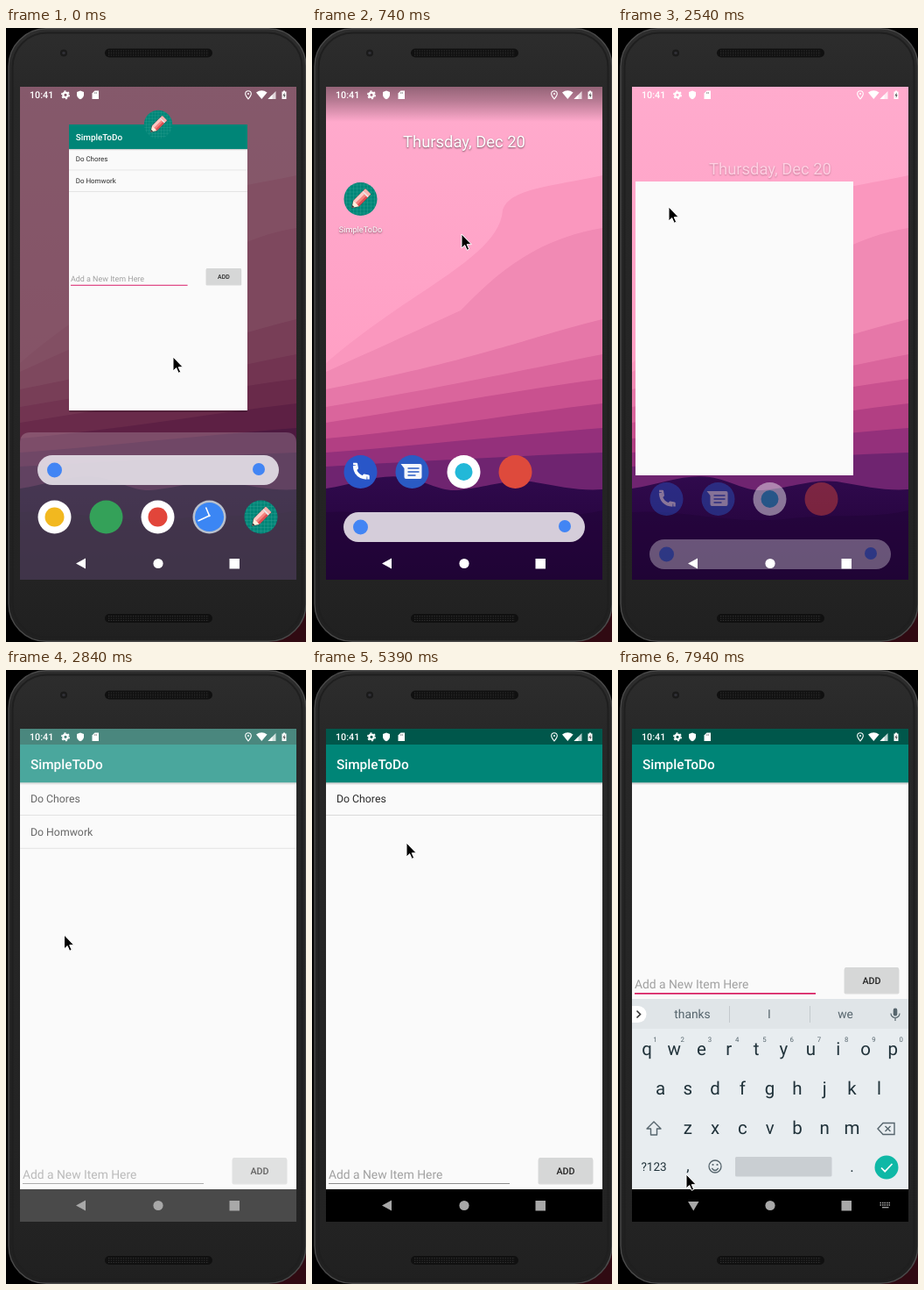
Animation of 343x700 px, one loop 8000 ms. Source, as an HTML page:

```html
<!DOCTYPE html>
<html lang="en">
<head>
<meta charset="utf-8">
<title>To-do app demo</title>
<style>
  html, body { margin: 0; width: 100%; height: 100%; overflow: hidden; background: #000; }
  svg { display: block; width: 343px; height: 700px; }
  text { font-family: Roboto, Arial, sans-serif; text-rendering: geometricPrecision; }
  .med { font-weight: 500; }
  .mid { text-anchor: middle; }
  .glow { text-shadow: 0 1px 2px rgba(0, 0, 0, .55); }
</style>
</head>
<body>
<svg id="stage" viewBox="0 0 343 700"></svg>
<script>
const LOOP = 8000;
const $ = id => document.getElementById(id);

// ---------- drawing helpers ----------
const rect = (x, y, w, h, fill, more = '') =>
  `<rect x="${x}" y="${y}" width="${w}" height="${h}" fill="${fill}" ${more}/>`;
const disc = (x, y, r, fill, more = '') =>
  `<circle cx="${x}" cy="${y}" r="${r}" fill="${fill}" ${more}/>`;
const path = (d, fill, more = '') => `<path d="${d}" fill="${fill}" ${more}/>`;
const line = (d, color, w, more = '') =>
  `<path d="${d}" fill="none" stroke="${color}" stroke-width="${w}" ${more}/>`;
const text = (x, y, size, fill, str, cls = '') =>
  `<text x="${x}" y="${y}" font-size="${size}" fill="${fill}" class="${cls}">${str}</text>`;
const group = (id, body, more = '') => `<g id="${id}" ${more}>${body}</g>`;
const at = (x, y, body, s = 1) => `<g transform="translate(${x} ${y}) scale(${s})">${body}</g>`;

// ---------- defs ----------
const stops = (...list) =>
  list.map(([o, c, a = 1]) => `<stop offset="${o}" stop-color="${c}" stop-opacity="${a}"/>`).join('');
const fade = (id, ...list) =>
  `<linearGradient id="${id}" x1="0" y1="0" x2="0" y2="1">${stops(...list)}</linearGradient>`;
const clip = (id, x, y, w, h) => `<clipPath id="${id}">${rect(x, y, w, h, '#000')}</clipPath>`;
const defs = `<defs>
  ${fade('body', [0, '#2d2d2d'], [.1, '#282828'], [.9, '#232323'], [1, '#202020'])}
  ${fade('sky', [0, '#ffabcd'], [.6, '#ff9fc4'], [1, '#f58eb8'])}
  ${fade('ground', [0, '#300a4d'], [.5, '#270540'], [1, '#1e0433'])}
  ${fade('topshade', [0, '#000', .42], [.4, '#000', .28], [1, '#000', 0])}
  ${fade('barshade', [0, '#000', .22], [1, '#000', 0])}
  ${clip('screen', 16, 67, 316, 562)}
  ${clip('above', 16, 67, 316, 525)}
  ${clip('cardbox', 16, 85, 316, 505)}
  <clipPath id="rowbox"><rect id="rowclip" x="16" y="129" width="316" height="37"/></clipPath>
  <clipPath id="round"><circle r="19"/></clipPath>
</defs>`;

// ---------- phone ----------
function phone() {
  const speaker = (y, h) => rect(113, y, 123, h, '#101010', `rx="${h / 2}"`) +
    [2.5, 5, 7.5].map(o => line(`M117 ${y + o}H232`, '#333', 1, 'stroke-dasharray="1.3 1.5"')).join('');
  return rect(0, 0, 343, 700, '#000') +
    path('M343 640V700H300Z', '#300a12') +
    rect(3, .8, 340, 698.5, 'url(#body)', 'rx="43" stroke="#4a4a4a" stroke-width="1.4"') +
    rect(7.5, 5.5, 331, 689, 'none', 'rx="39" stroke="#1f1f1f" stroke-width="2"') +
    speaker(23.5, 10) + speaker(668, 10) +
    disc(66, 28.5, 4, '#1a1a1a') + disc(66, 28.5, 1.8, '#303036');
}

// ---------- icons ----------
function pencil() {
  let grid = '';
  for (let i = -16; i <= 16; i += 4) grid += `M${i} -19V19M-19 ${i}H19`;
  return disc(0, 0, 19, '#008577') +
    line(grid, '#36a295', .4, 'clip-path="url(#round)"') +
    `<g transform="rotate(-45)">` +
    path('M-14 0L-7 -4.5H12V4.5H-7Z', '#f5837f', 'stroke="#4b3434" stroke-width=".8"') +
    path('M-14 0L-7 -4.5V4.5Z', '#fff0dd') + path('M-14 0L-11.5 -1.6V1.6Z', '#333') +
    rect(-7, -4.5, 14, 3.6, '#ffc9c5') + rect(-7, 2, 14, 2.5, '#dc4f53') +
    rect(7, -4.5, 2, 9, '#e8e8e8') + rect(9, -4.5, 3.4, 9, '#f8b5b0', 'rx="1"') + `</g>`;
}
const handset = () => disc(0, 0, 19, '#2956c8') +
  line('M-7 -7Q-6 6 7 7', '#fff', 3.4) +
  line('M-8.4 -9H-4.6L-3.8 -4L-6.4 -2M9 8.4V4.6L4 3.8L2 6.4', '#fff', 2.4, 'stroke-linejoin="round"');
const bubble = () => disc(0, 0, 19, '#2a5bc4') +
  path('M-13 -9H9Q11 -9 11 -7V6Q11 8 9 8H-7Q-9 8 -9 6V-4Z', '#f4f6fb') +
  line('M-5 -4H8M-5 0H8M-5 4H4', '#2a5bc4', 1.5);
const clock = () => disc(0, 0, 19, '#b9c0cc') + disc(0, 0, 16.5, '#3b86f4') +
  line('M-13 4.5L0 -1.5L-4 -11', '#fff', 1.6, 'stroke-linejoin="round"') + disc(0, -1.5, 1.2, '#fff');
const plain = (fill, r = 11) => disc(0, 0, 19, '#fff') + disc(0, 0, r, fill);

// ---------- launcher ----------
function wallpaper() {
  const bands = [
    ['M332 168C280 180 225 182 218 208C214 262 110 300 16 382', '#fa97be'],
    ['M332 228C260 240 215 275 170 322C120 345 60 372 16 392', '#f18ab4'],
    ['M332 332C250 352 190 378 16 412', '#e677a8'],
    ['M332 372C240 390 150 410 16 432', '#da659c'],
    ['M332 400C240 412 130 432 16 450', '#c9518f'],
    ['M332 428C230 440 130 458 16 468', '#b23f83'],
    ['M332 456C230 464 120 476 16 484', '#94307b'],
    ['M332 484C230 488 120 494 16 500', '#6f2470']
  ];
  return rect(16, 67, 316, 562, 'url(#sky)') +
    bands.map(([d, c]) => path(d + 'V629H332Z', c)).join('') +
    path('M16 525C50 520 75 508 105 512C130 516 145 528 165 527C200 524 220 514 250 517C280 522 305 528 332 526V629H16Z', 'url(#ground)') +
    path('M16 552C70 548 130 566 190 560C250 553 290 560 332 550V629H16Z', '#210438', 'opacity=".55"');
}
const slots = [55.5, 114.5, 173.5, 232.5, 291.5];
const row = (y, icons) => icons.map((icon, i) => at(slots[i], y, icon)).join('');
const home = () =>
  text(174, 136, 18.4, '#fff', 'Thursday, Dec 20', 'mid glow') +
  at(55.5, 195, pencil()) +
  text(55.5, 233, 9.2, '#fff', 'SimpleToDo', 'mid glow') +
  row(506, [handset(), bubble(), plain('#22b8d8', 10), disc(0, 0, 19, '#de4a3c')]);
const search = () => rect(36, 552, 276, 34, '#e4dfe8', 'rx="17" opacity=".92"') +
  disc(55.5, 569, 8.5, '#4285f4') + disc(289, 568, 7, '#4285f4');
const shelf = () => path('M16 629V473Q16 461 28 461H320Q332 461 332 473V629Z', '#fff', 'opacity=".2"') +
  row(557.5, [plain('#f2b81f'), disc(0, 0, 19, '#34a159'), plain('#e2453a'), clock(), pencil()]);

// ---------- to-do app ----------
const item = (id, y, label) => group(id, text(28, y + 22, 12.29, '#2a2a2a', label) +
  rect(16, y + 36.2, 316, 1, '#d9d9d9'));
const entry = (id, color, thick) =>
  text(19, 580, 13.83, '#a0a0a0', 'Add a New Item Here') +
  `<rect id="${id}" x="19" y="585" width="207" height="${thick}" fill="${color}"/>` +
  rect(258.5, 557, 63, 29.4, '#000', 'rx="2" opacity=".13"') +
  rect(259, 556, 62, 29, '#d6d7d7', 'rx="1.5"') +
  text(290, 574.6, 10.75, '#222', 'ADD', 'med mid');
const toolbar = () => rect(16, 85, 316, 43.3, '#008577') + rect(16, 128.3, 316, 3, 'url(#barshade)') +
  text(28, 112.6, 15.36, '#fff', 'SimpleToDo', 'med');

const card = () =>
  rect(72, 111, 204, 327, '#000', 'rx="2" opacity=".2"') +
  `<g transform="translate(72 110) scale(.6456) translate(-16 -85)" clip-path="url(#cardbox)">` +
  rect(16, 85, 316, 505, '#fafafa') + toolbar() +
  item('c1', 128.8, 'Do Chores') + item('c2', 166.6, 'Do Homwork') +
  `<g transform="translate(0 -217)">${entry('cline', '#e0508a', 2)}</g></g>` +
  at(174, 110, pencil(), .85);

const app = () =>
  rect(16, 67, 316, 525, '#fafafa') +
  group('press', rect(16, 129, 316, 37, '#000', 'opacity=".06"') +
    '<circle id="ripple" fill="#000" opacity=".09"/>', 'clip-path="url(#rowbox)"') +
  rect(16, 67, 316, 18.2, '#00574b') + toolbar() +
  item('row1', 128.8, 'Do Chores') + item('row2', 166.6, 'Do Homwork') +
  group('entry', entry('under', '#8c8c8c', 1)) +
  rect(16, 592, 316, 37, '#000');

function keyboard() {
  const ink = '#20323a', soft = '#56656d';
  const keys = (str, x, y) => [...str].map((c, i) => text(x + 31.25 * i, y, 20.5, ink, c, 'mid')).join('');
  const digits = [...'1234567890'].map((c, i) => text(42.5 + 31.25 * i, 424, 7.8, soft, c, 'mid')).join('');
  return rect(16, 375, 316, 217, '#e8edf0') + rect(16, 375, 316, 34, '#e0e5e8') +
    path('M16 383H23A9.5 9.5 0 0 1 23 402H16Z', '#fff') +
    line('M21.5 388.5L25.5 392.5L21.5 396.5', '#333', 1.6) +
    line('M127.5 383V402M219.5 383V402', '#c3c9cd', 1) +
    text(85, 397.3, 13.8, soft, 'thanks', 'mid') + text(173, 397.3, 13.8, soft, 'I', 'mid') +
    text(260, 397.3, 13.8, soft, 'we', 'mid') +
    rect(314.7, 385.5, 4.6, 9, soft, 'rx="2.3"') +
    line('M312 391.5A5 5 0 0 0 322 391.5M317 396.5V400', soft, 1.2) +
    keys('qwertyuiop', 33, 438.5) + digits +
    keys('asdfghjkl', 48.6, 483.5) + keys('zxcvbnm', 79.9, 529) +
    line('M41 515L49 523H44.5V530H37.5V523H33Z', soft, 1.4, 'stroke-linejoin="round"') +
    line('M303 516.5H316V529.5H303L297 523ZM305.5 520L311.5 526M311.5 520L305.5 526', soft, 1.4) +
    text(41, 571, 13.5, ink, '?123', 'mid') + text(80, 571, 17, ink, ',', 'mid') +
    text(267.5, 572, 17, ink, '.', 'mid') +
    disc(111, 566, 7, 'none', `stroke="${soft}" stroke-width="1.3"`) +
    disc(108.5, 564, 1.1, soft) + disc(113.5, 564, 1.1, soft) +
    line('M107.3 568Q111 573 114.7 568', soft, 1.3) +
    rect(134, 555, 110.5, 22.5, '#c9ced2', 'rx="1.5"') +
    disc(307, 567, 13.5, '#0fb8a6') + line('M301 567.5L305.2 571.7L313.5 563', '#fff', 1.7);
}

// ---------- system bars ----------
const status = () => text(27, 80.4, 10.75, '#fff', '10:41', 'med') +
  disc(68, 76.3, 2.7, 'none', 'stroke="#fff" stroke-width="2.2"') +
  disc(68, 76.3, 4.3, 'none', 'stroke="#fff" stroke-width="1.4" stroke-dasharray="2.2 2.3"') +
  path('M85 71.5L89 73V76.5Q88.6 79.7 85 81.3Q81.400 79.7 81 76.5V73Z', '#fff') +
  path('M98.500 74.500L101.500 71.500H106V81H98.500Z', '#fff') +
  line('M101.7 73V75M103.300 73V75', '#777', .7) +
  line('M277 81Q273.700 77 273.700 75A3.300 3.300 0 0 1 280.300 75Q280.300 77 277 81Z', '#fff', 1.1) +
  disc(277, 75, 1, '#fff') +
  path('M286 73.500Q292.300 69 298.600 73.500L292.300 81Z', '#fff') +
  path('M308.500 72V81H299.500Z', '#fff', 'opacity=".75"') + path('M304.500 76V81H299.500Z', '#fff') +
  path('M315.500 72.500H317V71.500H319V72.500H320.500V81H315.500Z', '#fff') +
  path('M318.500 73.500L316.500 77.200H317.800V80L319.600 76.300H318.500Z', '#555');
const nav = () => path('M80 610.500L91 604.500V616.500Z', 'inherit', 'id="back"') +
  path('M80 606H92.500L86.250 616.500Z', 'inherit', 'id="down"') +
  '<circle cx="174" cy="610.5" r="5.6"/><rect x="255.500" y="605" width="11.500" height="11.500"/>' +
  group('imekey', line('M299.500 607.500H312M299.500 610H312', '#a8a8a8', 1.500, 'stroke-dasharray="1.500 1"') +
    line('M302 612.700H309.500', '#a8a8a8', 1.300));

$('stage').innerHTML = defs + phone() +
  `<g clip-path="url(#screen)">` +
  wallpaper() + group('topdark', rect(16, 67, 316, 40, 'url(#topshade)')) +
  group('home', home()) + group('dim', rect(16, 67, 316, 562, '#000', 'opacity=".48"')) +
  group('shelf', shelf()) + group('search', search()) + group('card', card()) +
  '<rect id="win" fill="#fafafa"/>' + group('app', app()) +
  `<g clip-path="url(#above)">${group('keys', keyboard())}</g>` +
  status() + group('nav', nav()) + '</g>' +
  group('mouse', path('M0 0V16L3.700 12.600L6.200 18.300L8.700 17.200L6.200 11.700H11.300Z', '#000',
    'stroke="#fff" stroke-width="1"'));

// ---------- motion: [ms, values...] ----------
const tracks = {
  mouse: [[0, 191, 375], [150, 189, 350], [300, 180, 285], [450, 171, 235], [740, 171, 235],
    [890, 125, 90], [1040, 86, 19], [1190, 76, 28], [1340, 72, 70], [1490, 66, 130], [1640, 60, 180],
    [1790, 58, 204], [2690, 58, 204], [2990, 75, 400], [3290, 100, 560], [3590, 230, 594],
    [3740, 254, 588], [3890, 205, 582], [4040, 133, 569], [4190, 100, 430], [4340, 110, 259],
    [4490, 107, 225], [4640, 108, 197], [5540, 108, 197], [5690, 98, 172], [5840, 89, 155],
    [6590, 89, 155], [6740, 85, 290], [6890, 80, 460], [7040, 78, 551], [7340, 78, 575]],
  card: [[0, 0], [150, -25], [300, -110], [450, -390]],
  recents: [[450, 1], [590, .35], [740, 0]],
  open: [[2240, 0], [2390, .25], [2540, 1], [2690, 1.3]],
  win: [[2390, 36, 170, 70, 90], [2540, 20, 175, 249, 335], [2690, 16, 90, 316, 510], [2840, 16, 67, 316, 562]],
  app: [[2690, 0], [2840, .7], [2990, 1]],
  keys: [[7490, 217], [7640, 110], [7790, 25], [7940, 0]]
};
function value(name, t) {
  const k = tracks[name];
  if (t <= k[0][0]) return k[0].slice(1);
  for (let i = 1; i < k.length; i++) {
    if (t <= k[i][0]) {
      const a = k[i - 1], b = k[i], p = (t - a[0]) / (b[0] - a[0]);
      return a.slice(1).map((v, j) => v + (b[j + 1] - v) * p);
    }
  }
  return k[k.length - 1].slice(1);
}

const tick = t => t < 590 ? Math.floor(t / 150) * 150 : 590 + Math.floor((t - 590) / 150) * 150;

const set = (id, attrs) => { for (const k in attrs) $(id).setAttribute(k, attrs[k]); };
const show = (id, on) => set(id, { visibility: on ? 'visible' : 'hidden' });
const move = (id, x, y) => set(id, { transform: `translate(${x} ${y})` });

function draw(t) {
  const [mx, my] = value('mouse', t), [r] = value('recents', t), [open] = value('open', t);
  const [x, y, width, height] = value('win', t), inApp = t >= 2840, typing = t >= 7490;
  move('mouse', mx, my);
  move('card', 0, value('card', t)[0]);
  show('card', t < 450);

  move('home', 0, 31 * open);
  set('home', { opacity: (1 - r) * Math.max(0, 1 - .55 * open) });
  move('search', 0, 31 * open - 65 * r);
  set('search', { opacity: Math.max(0, 1 - .6 * open) });
  set('topdark', { opacity: (1 - r) * Math.max(0, 1 - open) });
  set('dim', { opacity: r });
  set('shelf', { opacity: r });
  move('shelf', 0, 65 * (1 - r));

  show('win', t >= 2390);
  set('win', { x, y, width, height });
  set('app', { opacity: value('app', t)[0] });

  const second = t >= 4940 && t < 5390, first = t >= 6140 && t < 6590;
  const start = second ? 4940 : 6140;
  show('press', first || second);
  move('press', 0, second ? 38 : 0);
  set('ripple', { cx: mx, cy: second ? my - 38 : my, r: 40 + Math.max(0, t - start) * .7 });
  show('row1', t < 6590);
  show('row2', t < 5390);

  move('entry', 0, t >= 7640 ? -217 : 0);
  set('under', { fill: typing ? '#d81b60' : '#8c8c8c', height: typing ? 1.7 : 1 });
  show('keys', t >= 7640);
  move('keys', 0, value('keys', t)[0]);
  set('nav', { fill: inApp ? '#a8a8a8' : '#fff' });
  show('back', !typing);
  show('down', typing);
  show('imekey', typing);
}

const begin = performance.now();
function frame() {
  draw(tick((performance.now() - begin) % LOOP));
  requestAnimationFrame(frame);
}
frame();
</script>
</body>
</html>
```
